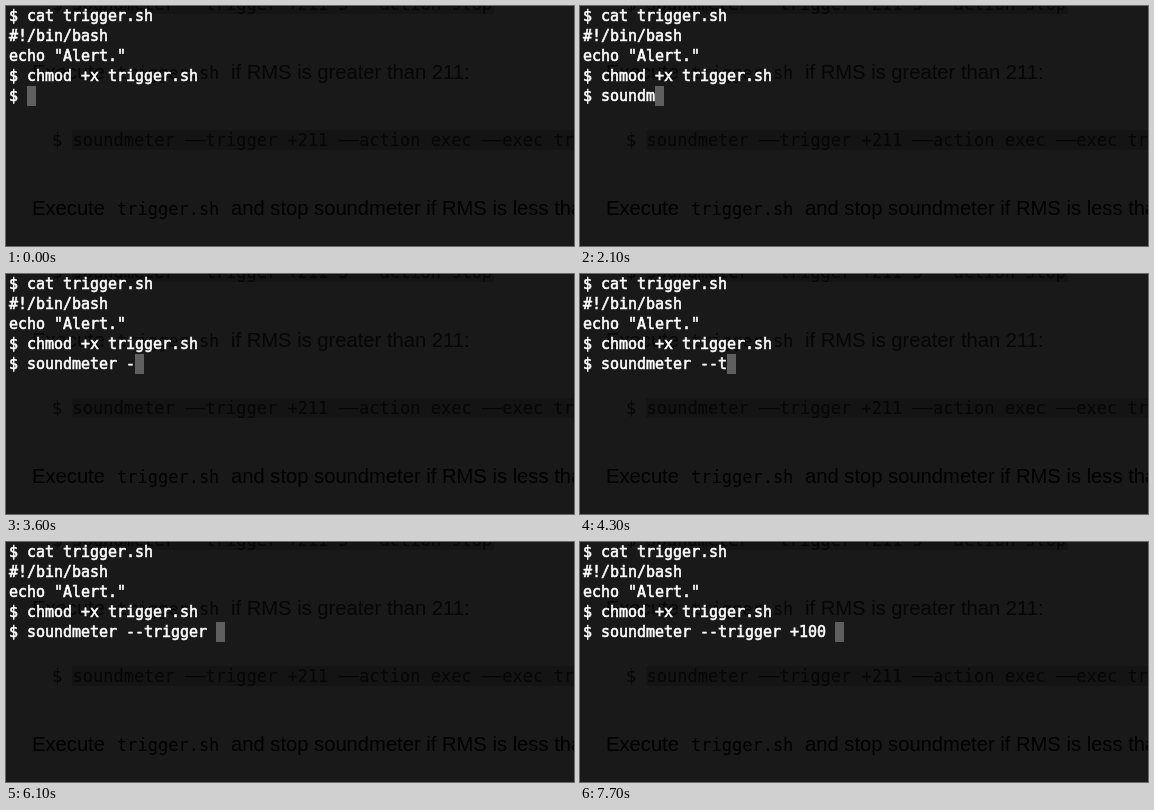
An HTML page for the animation above (8 s loop, 568 by 240 pixels).

```html
<!DOCTYPE html>
<html lang="en">
<head>
<meta charset="utf-8">
<title>Terminal</title>
<style>
html, body { margin: 0; width: 100%; height: 100%; overflow: hidden; background: #191919; }
svg { display: block; }
text { white-space: pre; }
.page { font: 20.2px "Liberation Sans", Arial, sans-serif; }
.code { font: 17px "DejaVu Sans Mono", monospace; }
.dim { fill: #060606; }
.dark { fill: #000; }
.term {
  font: 15px "DejaVu Sans Mono", monospace; letter-spacing: -0.03px;
  fill: #fff; stroke: #fff; stroke-width: 0.6px;
}
.block { fill: #141414; }
</style>
</head>
<body>
<svg width="568" height="240" viewBox="0 0 568 240">
  <rect width="568" height="240" fill="#191919"/>
  <rect class="block" x="66" y="-12" width="422" height="20"/>
  <rect class="block" x="66" y="124" width="502" height="20"/>
  <g class="dim">
    <text class="code" x="46" y="4">$ soundmeter ––trigger +211 5 ––action stop</text>
    <text class="page" x="26" y="73">Execute</text>
    <text class="code" x="111" y="73">trigger.sh</text>
    <text class="page" x="225" y="73">if RMS is greater than 211:</text>
    <text class="code" x="46" y="140">$ soundmeter ––trigger +211 ––action exec ––exec trigger.sh</text>
  </g>
  <g class="dark">
    <text class="page" x="26" y="209">Execute</text>
    <text class="code" x="111" y="209">trigger.sh</text>
    <text class="page" x="225" y="209">and stop soundmeter if RMS is less than 211:</text>
  </g>
  <rect id="cursor" x="21" y="80" width="9" height="20" fill="#5f5f5f"/>
  <g class="term">
    <text x="3" y="15">$ cat trigger.sh</text>
    <text x="3" y="35">#!/bin/bash</text>
    <text x="3" y="55">echo "Alert."</text>
    <text x="3" y="75">$ chmod +x trigger.sh</text>
    <text x="3" y="95" id="line">$ </text>
  </g>
</svg>
<script>
const LOOP = 8000, LEFT = 3, CELL = 9;
const prompt = "$ ", command = "soundmeter --trigger +100 ";
// time in ms at which each character of the command appears
const keys = [
  900, 1100, 1300, 1500, 1800, 2100, 2300, 2600, 2800, 2900, 3100,
  3600, 4000, 4200, 4400, 4600, 4800, 5000, 5100, 5200, 5300,
  6400, 6700, 7000, 7300, 7700
];
const line = document.getElementById("line");
const cursor = document.getElementById("cursor");
const start = performance.now();
let shown = -1;

function draw(now) {
  const t = Math.max(0, now - start) % LOOP;
  const count = keys.filter(k => k <= t).length;
  if (count !== shown) {
    shown = count;
    line.textContent = prompt + command.slice(0, count);
    cursor.setAttribute("x", LEFT + (prompt.length + count) * CELL);
  }
  requestAnimationFrame(draw);
}
draw(start);
</script>
</body>
</html>
```
